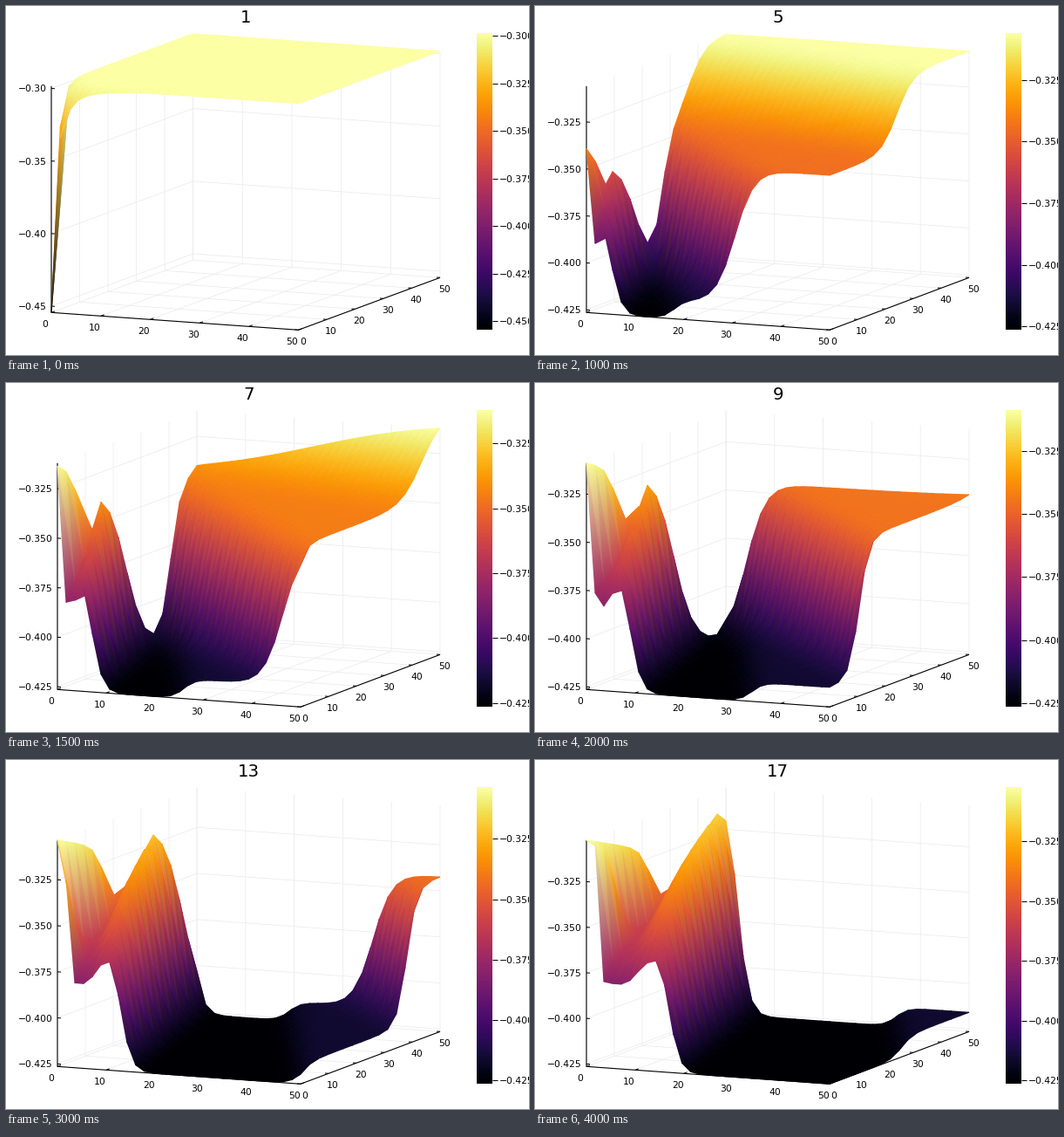
These frames come from a looping animation (600 px wide and 400 px high, 4.25 s). A matplotlib script:

```python
import numpy as np
import matplotlib.pyplot as plt
from matplotlib.animation import FuncAnimation
from matplotlib.collections import LineCollection
from matplotlib.tri import Triangulation

W, H, DPI = 600, 400, 100
STEPS, INTERVAL = 17, 250
PX = 72 / DPI
SIZE, HEIGHT = 50, 259.5
NX, NY = 29, 17
plt.rcParams["font.family"] = "DejaVu Sans"

X, Y = np.meshgrid(np.linspace(0, SIZE, NX), np.linspace(0, SIZE, NY))


def step_up(s, mid, width):
    return 1 / (1 + np.exp(-np.clip((s - mid) / width, -60, 60)))


def mix(a, b, w):
    return a + (b - a) * w


def relief(t):
    """Surface height, 0 to 1: waves leave the near corner at fixed speeds."""
    # fronts on the outer side: shallow shelf, main rise, upper rise
    shelf = 22 * step_up(X + .62 * Y, 4 * t - 2, 1.2)
    rise = 155 * step_up(X + 1.15 * Y, 7.9 * t - 9, min(2, 1 + .3 * t))
    upper = 82 * step_up(Y + .26 * X, 9.6 * t - 11, .9 + .38 * t)
    outer = shelf + rise + upper

    # valley and ridge that stay near the corner and drift slowly
    grow = step_up(t, 3.85, 1.05)
    s = X + .32 * Y
    valley = 97 + 40 * (1 - np.exp(-Y / 5))
    crest = 142 + 105 * (1 - np.exp(-Y / 14))
    v_pos, c_pos = .5 * t - .3, t - 2
    climb = np.clip((s - v_pos) / max(c_pos - v_pos, .5), 0, 1)
    ridge = mix(valley, crest, climb) * np.sqrt(grow)
    peak = (259 - 1.7 * Y) * grow
    inner = mix(peak, ridge, step_up(Y + 9 * X, 1.5 * t - 1.7, 1.8))

    edge = min(t, 1.35 * t - 1.1) + .03 * Y
    z = mix(inner, outer, step_up(s, edge, min(1.1, .4 * t - .1)))
    return (z - z.min()) / np.ptp(z)


def z_range(t):
    lo = np.interp(t, [1, 2, 3, 5], [-.4544, -.4503, -.4239, -.4264])
    hi = np.interp(t, [1, 2, 3, 5, 7, 9, 13, 17],
                   [-.2984, -.2995, -.3051, -.3059, -.3121, -.3089, -.3035, -.3022])
    return lo, hi


def grid_triangles():
    """Cells from back to front: far rows first, left to right."""
    tris = []
    for j in range(NY - 2, -1, -1):
        for i in range(NX - 1):
            a = j * NX + i
            b, c, d = a + 1, a + NX, a + NX + 1
            tris += [(a, d, c), (a, b, d)]
    return np.array(tris)


TRIANGLES = grid_triangles()


class View:
    """Oblique projection of the box onto the stage."""

    def __init__(self, left):
        span = (498 - left) / SIZE
        self.left, self.kx, self.ky = left, .6355 * span, .3645 * span

    def __call__(self, x, y, h=0):
        return np.stack(np.broadcast_arrays(
            self.left + self.kx * x + self.ky * y,
            351.3 + .4 * x - 1.2 * y - HEIGHT * h), axis=-1)

    def path(self, *points):
        return [self(*p) for p in points]


def ticks(lo, hi, gap):
    return gap * np.arange(np.ceil(lo / gap), np.floor(hi / gap) + 1)


def number(value, digits):
    return f"{value:.{digits}f}".replace("-", "\u2212")


def label(x, y, text, size=10.7, ha="center"):
    ax.text(x, y, text, fontsize=size * PX, color="black",
            ha=ha, va="center_baseline")


def lines(segments, color, width):
    ax.add_collection(LineCollection(segments, colors=color,
                                     linewidths=width * PX, zorder=1))


def draw_box(view, lo, hi, gap, digits):
    grid, marks = [], []
    for k in range(0, SIZE + 1, 10):
        grid += [view.path((k, 0), (k, SIZE), (k, SIZE, 1)),
                 view.path((SIZE, k), (0, k), (0, k, 1))]
        fx, fy = view(k, 0)
        rx, ry = view(SIZE, k)
        marks += [[(fx, fy), (fx + 4, fy - 1.5)], [(rx, ry), (rx - 4, ry - .3)]]
        label(fx - 7, fy + 13, str(k))
        label(rx + 5, ry + 13, str(k))
    for z in ticks(lo, hi, gap):
        h = (z - lo) / (hi - lo)
        grid.append(view.path((0, 0, h), (0, SIZE, h), (SIZE, SIZE, h)))
        x, y = view(0, 0, h)
        marks.append([(x, y), (x + 4, y + .3)])
        label(x - 5.3, y, number(z, digits), ha="right")
    lines(grid, "#ececec", .8)
    lines([view.path((0, 0, 1), (0, 0), (SIZE, 0), (SIZE, SIZE))], "black", 1.1)
    lines(marks, "black", 1)


def draw_bar(lo, hi):
    ax.imshow(np.linspace(1, 0, 340)[:, None], cmap="inferno", vmin=0, vmax=1,
              extent=(540, 558, 371, 31), aspect="auto", zorder=2)
    marks = []
    for z in ticks(lo, hi, .025):
        y = 371 - 340 * (z - lo) / (hi - lo)
        marks.append([(558, y), (563.5, y)])
        label(565.5, y, number(z, 3), ha="left")
    lines(marks, "black", 1)


def draw(i):
    t = i + 1
    ax.clear()
    ax.axis("off")
    lo, hi = z_range(t)
    coarse = hi - lo > .14
    view = View(52 if coarse else 59)
    draw_box(view, lo, hi, *((.05, 2) if coarse else (.025, 3)))
    z = relief(t)
    px, py = view(X, Y, z).reshape(-1, 2).T
    ax.tripcolor(Triangulation(px, py, TRIANGLES), z.ravel(), cmap="inferno",
                 vmin=0, vmax=1, shading="gouraud", zorder=4)
    draw_bar(lo, hi)
    label((view.left + 498) / 2, 11.5, str(t), size=19.8)
    ax.set(xlim=(0, W), ylim=(H, 0))
    return []


fig = plt.figure(figsize=(W / DPI, H / DPI), dpi=DPI, facecolor="white")
ax = fig.add_axes([0, 0, 1, 1])
anim = FuncAnimation(fig, draw, frames=STEPS, interval=INTERVAL,
                     init_func=lambda: [], repeat=True, repeat_delay=0)
plt.show()
```
